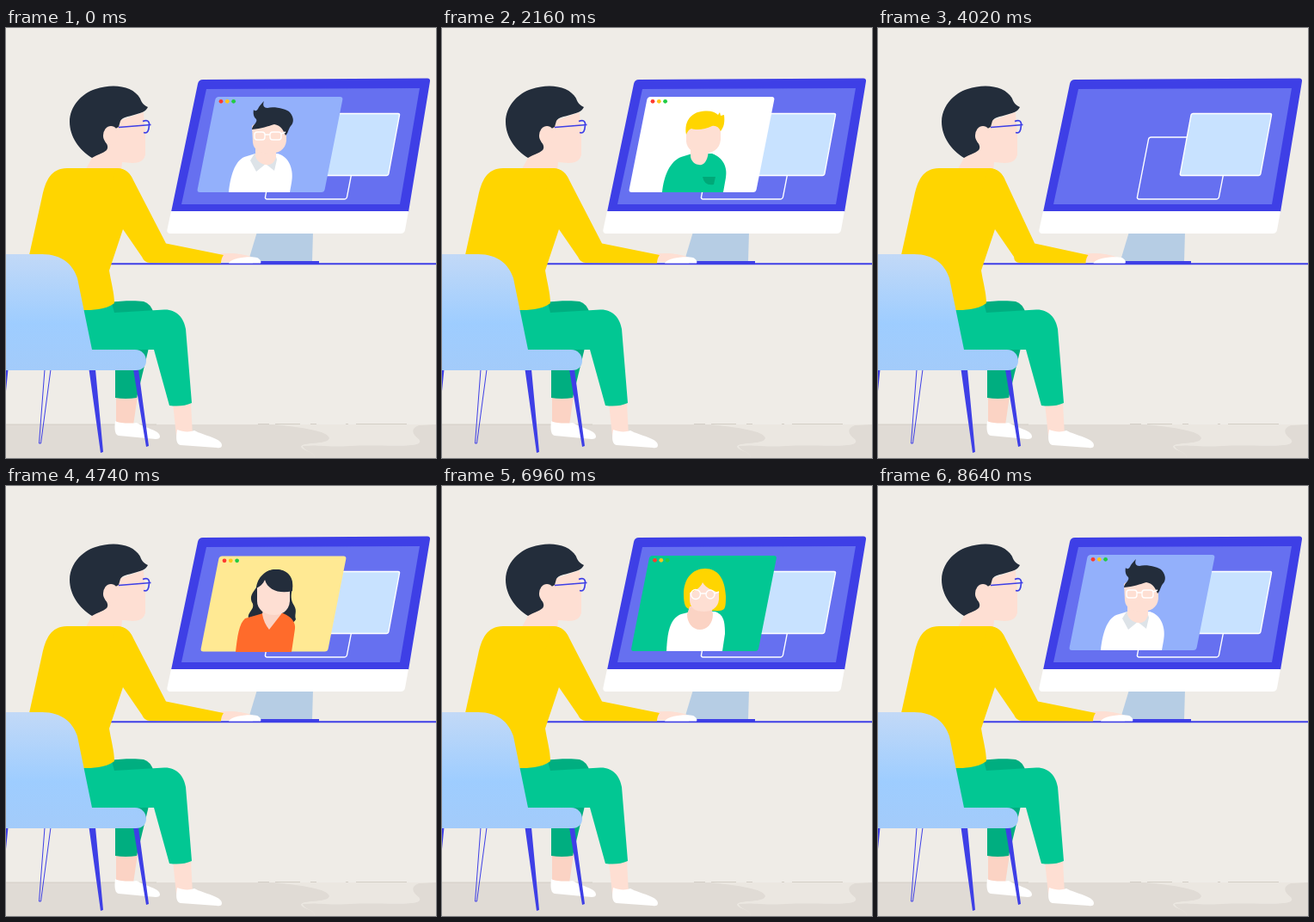
An HTML page for the animation above (9 s loop, 500x500 px).

```html
<!DOCTYPE html>
<html lang="en">
<head>
<meta charset="utf-8">
<title>Video call carousel</title>
<style>
  html, body { margin: 0; width: 100%; height: 100%; overflow: hidden; background: #efece7; }
  svg { display: block; width: 100vw; height: 100vh; }
  .skin { fill: #fedfd3; }
  .shade { fill: #fbd3c4; }
  .dark { fill: #232d3b; }
  .green { fill: #02c793; }
  .deep { fill: #00ae80; }
  .yellow { fill: #ffd500; }
  .blue { fill: #3e3fe6; }
  .white { fill: #fff; }
  .line { fill: none; stroke: #fff; stroke-width: 1.4; }
</style>
</head>
<body>
<svg viewBox="0 0 500 500">
  <defs>
    <linearGradient id="seat" x1="0" y1="0" x2="0" y2="1">
      <stop offset="0" stop-color="#c2d9f7"/>
      <stop offset=".6" stop-color="#9ecdff"/>
      <stop offset="1" stop-color="#a3cbfa"/>
    </linearGradient>
    <clipPath id="screen"><path d="M233 71 L481 70 L458 205 H204Z"/></clipPath>
  </defs>

  <!-- floor -->
  <path fill="#ebe7e1" d="M0 461 H500 V500 H0Z"/>
  <path fill="#e0dbd5" d="M0 461 H310 C345 464 375 469 376 477 C374 485 343 481 343 487 C347 493 359 492 359 500 H0Z"/>
  <path fill="#e0dbd5" d="M345 486 C365 484 375 488 400 486 C440 484 490 490 480 478 C472 472 470 465 481 462 L500 461 V500 H359 C359 492 347 493 345 486Z"/>
  <path stroke="#d3cec6" d="M0 461 H175 M293 460.5 H306 M313 460.5 H342 M354 460.5 H361 M395 460.5 H398 M407 460.5 H466"/>

  <!-- monitor -->
  <path fill="#b6cde4" d="M292 237 H357 L356 272 H283 V267Z"/>
  <path class="blue" d="M229 60 L490 58.5 Q493.5 58.5 493 62 L468 214 H192 L223 65 Q224 60 229 60Z"/>
  <path class="white" d="M192 213 H468 L464 235 Q463 239 459 239 H190 Q186.500 238 187.500 234Z"/>
  <path fill="#6670f0" d="M233 71 L481 70 L458 205 H204Z"/>
  <g clip-path="url(#screen)">
    <g transform="translate(301 199) skewX(-11)"><rect class="line" y="-72" width="95" height="72" rx="2.500"/></g>
    <g transform="translate(351 171.500) skewX(-10.500)"><rect class="line" style="fill:#c8e2ff" y="-72" width="93.500" height="72" rx="2"/></g>
    <g id="cards"></g>
  </g>

  <!-- desk -->
  <path class="blue" d="M121 273.200 H500 V275.200 H121Z M287 271 H364 V274 H287Z"/>

  <!-- legs and shoes -->
  <path class="shade" d="M128 428 H153 L148 462 H128Z"/>
  <path class="skin" d="M194 436 H215 L217 474 H198Z"/>
  <path class="white" d="M127 457 C133 460 146 460 152 459 C164 466 179 468 179 475 Q179 478 174 478 L131 474 Q125 473 127 457Z"/>
  <path class="white" d="M199 467 C206 470 214 470 219 468 C230 474 251 477 251 485 Q251 489 245 488 L203 485 Q196 484 199 467Z"/>
  <path class="deep" d="M127 372 H166 L152 430 Q139 432 127 430Z"/>
  <path class="deep" d="M120 319 C135 317 152 317 160 318 Q168 320 172 332 L120 336Z"/>
  <path class="green" d="M80 316 H122 L126 331 L184 327.500 C198 327 207 337 209 350 L216 436 Q205 441 190 439 L172 374 H80Z"/>

  <!-- viewer -->
  <path class="skin" d="M131 108 L160 98 C160 106 162 116 162 124 V147 C161 154 155 157 147 157 L135 156 L134 166 C120 170 103 168 93 164 L102 147Z"/>
  <path class="dark" d="M100 151 C85 142 74 126 74 109 C74 91 88 76 104 71 C124 64 148 67 156 82 C158 88 161 90 165 92 C162 98 156 99 149 101 C142 103 135 104 133 108 L131 115 L113 125 C114 133 121 136 117 142 C113 146 106 147 100 151Z"/>
  <ellipse class="skin" cx="122" cy="125" rx="9" ry="11"/>
  <path fill="none" stroke="#3e3fe6" stroke-width="1.700" d="M131 115.500 L168.500 112.500 M159 108.500 C164 106.500 167 108 166.500 113 C166 119 165 123 160 121.500"/>
  <path class="yellow" d="M42 196 C46 178 52 163 71 163 H128 C137 163 143 167 147 175 L150 210 L136 234 L120 282 C122 295 126 308 126 320 C115 328 100 328 90 328 L27 264Z"/>
  <g id="hand">
    <path class="skin" d="M245 263 C260 261 276 262 287 267 V272 H245Z"/>
    <path class="white" d="M259 273.500 C262 267 284 265 292 267 C296 269 297 272 296 273.500Z"/>
  </g>
  <path id="arm" class="yellow"/>

  <!-- chair -->
  <path class="blue" d="M96.500 397 H104 L113 493 L110 494Z M148 397 H154 L166 486 L163 487Z M0 397 H2.500 L0 422Z"/>
  <path fill="none" stroke="#3e3fe6" d="M45 397 L38.500 483 H40.500 L52 397"/>
  <path fill="url(#seat)" d="M0 263 H42 C65 263 78 275 83 291 L100 374 H150 C158 374 163 380 163 387 C163 393 159 398 151 398 H0Z"/>
</svg>

<script>
const LOOP = 9000;
const $ = id => document.getElementById(id);
const shape = (cls, d) => `<path class="${cls}" d="${d}"/>`;
const fill = (color, d) => `<path fill="${color}" d="${d}"/>`;

const people = {
  quiff:
    shape('white', 'M259 191 C261 172 266 155 277 150 L290 146 H316 C330 150 335 166 332 180 L330 191Z') +
    fill('#dde3e8', 'M289 146 L284 154 L291 167 L302 158 L312 166 L315 153 L313 146Z') +
    shape('skin', 'M290 138 H314 V150 C312 158 306 160 302 159 C296 158 291 154 290 149Z') +
    shape('skin', 'M286 114 C295 106 316 106 326 114 V131 C325 142 316 146 306 146 C295 146 288 142 287 133Z') +
    shape('dark', 'M286 118 C286 113 293 110 291 106 C288 104 287 99 288 95 C290 98 293 95 294 92 C296 89 298 87 300 85 C298 90 300 93 304 93 C312 91 326 94 330 98 C335 104 335 110 331 114 C328 118 328 123 325 125 C323 120 320 113 312 112 C305 114 297 117 286 118Z') +
    '<g class="line"><rect x="289" y="121" width="12" height="9" rx="3"/><rect x="307" y="121" width="13" height="9" rx="3"/><path d="M301 124 H307 M320 123 L325 121"/></g>',
  blond:
    shape('green', 'M256 191 C258 172 265 155 278 150 L291 146 H314 C328 151 332 163 330 174 L327 191Z') +
    shape('skin', 'M289 138 H311 L309 149 C307 157 303 160 299 159 C294 159 289 154 289 149Z') +
    shape('skin', 'M284 117 C294 108 314 108 324 115 V130 C323 141 314 146 304 146 C292 146 285 141 284 132Z') +
    shape('yellow', 'M284 124 C281 107 291 97 306 96.500 C313 96 318 98 321 101 L323 98 L324 102 L328 101 C329 109 328 115 324 120 C322 115 318 113 314 114 C306 118 296 119 290 117 C287 118 285 121 284 124Z') +
    fill('#00a878', 'M303 173 H318 L316 182 Q305 184 303 173Z'),
  waves:
    shape('dark', 'M298 106 C301 99 307 97 314 97 C328 97 335 107 333 119 C331 127 331 133 335 139 C339 146 335 149 337 155 C334 162 325 159 320 153 L298 148 C295 157 286 159 282 154 C280 147 289 144 287 137 C282 129 287 124 291 118Z') +
    fill('#ff6b2b', 'M267 193 C269 175 271 160 278 154 L299 148 H322 C333 152 337 160 336 166 L332 193Z') +
    shape('shade', 'M299 143 H321 L320 149 L306 167 C302 162 299 156 298 149Z') +
    shape('skin', 'M292 118 C297 103 323 105 330 118 V134 C329 146 320 150 312 150 C300 150 292 143 292 134Z') +
    shape('dark', 'M291 119 C292 106 302 97 314 97 C327 97 335 107 333 122 C319 126 304 121 301 109 C299 114 295 117 291 119Z'),
  bob:
    shape('yellow', 'M290 143 C283 144 281 137 281 126 C281 108 291 96 306 96 C321 96 329 108 330 128 C330 135 330 140 328 143 C325 146 319 145 314 145Z') +
    shape('white', 'M261 192 C262 170 265 154 278 149 L290 146 H317 C327 149 329 156 329 172 L326 192Z') +
    shape('shade', 'M288 140 H313 L315 149 C315 160 308 167 300 167 C291 167 285 159 285 149Z') +
    shape('skin', 'M288 116 C296 108 315 108 322 116 V132 C321 142 313 146 305 146 C294 146 288 142 288 132Z') +
    shape('yellow', 'M285 125 C285 106 296 100 306 100 C317 100 325 110 325 124 C316 123 307 119 303 112 C301 118 294 123 285 125Z') +
    '<g class="line"><circle cx="295" cy="126" r="5.500"/><circle cx="312" cy="126" r="5"/><path d="M300.500 125 H307 M317 125 L322 123"/></g>'
};

// start/end of arrival, start/end of departure, arrival easing power
const cards = [
  { who: 'quiff', color: '#93b0fb', x: 222, y: 191, time: [8220, 8640, 930, 1170], pow: 3 },
  { who: 'blond', color: '#ffffff', x: 217, y: 191, time: [1090, 1830, 3330, 3900], pow: 7 },
  { who: 'waves', color: '#ffe993', x: 226, y: 192.5, time: [4245, 4740, 6090, 6420], pow: 3 },
  { who: 'bob', color: '#02c793', x: 219.5, y: 192, time: [6360, 6960, 7950, 8280], pow: 3 }
];

const dots = ['#ff3b30', '#ffc61a', '#22cc44']
  .map((c, i) => `<circle cx="${28 + i * 7.3}" cy="-105.700" r="2.400" fill="${c}"/>`).join('');

for (const card of cards) {
  const g = document.createElementNS('http://www.w3.org/2000/svg', 'g');
  g.innerHTML = `<g transform="translate(${card.x} ${card.y})">
    <rect transform="skewX(-11.200)" y="-111" width="148" height="111" rx="3.500" fill="${card.color}"/>${dots}
    </g>${people[card.who]}`;
  $('cards').append(g);
  card.node = g;
}

// mouse hand: time, horizontal shift
const pulls = [
  [0, 0], [930, 0], [1080, -8.5], [1300, 0],
  [3330, 0], [3700, -8.5], [4150, -8.5], [4600, 0],
  [6090, 0], [6320, -8.5], [6800, 0],
  [7950, 0], [8180, -8.5], [8600, 0], [LOOP, 0]
];

const wrap = t => (t + LOOP) % LOOP;
const smooth = p => p * p * (3 - 2 * p);

function pull(t) {
  const i = pulls.findIndex(k => k[0] > t);
  const [t0, a] = pulls[i - 1], [t1, b] = pulls[i];
  return a + (b - a) * smooth((t - t0) / (t1 - t0));
}

function placeCard({ node, time: [in0, in1, out0, out1], pow }, t) {
  const age = wrap(t - in0), arrive = in1 - in0;
  const leave = wrap(out0 - in0), gone = wrap(out1 - in0);
  let dx = 0;
  if (age < arrive) dx = 260 * (1 - age / arrive) ** pow;
  else if (age > leave) dx = -195 * Math.min(1, (age - leave) / (gone - leave)) ** 2;
  node.setAttribute('visibility', age < gone ? 'visible' : 'hidden');
  node.setAttribute('transform', `translate(${dx.toFixed(2)} 0)`);
}

function draw(now) {
  const t = now % LOOP, h = pull(t);
  for (const card of cards) placeCard(card, t);
  $('hand').setAttribute('transform', `translate(${h} 0)`);
  $('arm').setAttribute('d', `M128 163 C137 163 143 167 147 175 L${186 + h * .45} 250.500
    L${253 + h} 264 Q${250 + h} 268 ${250 + h} 273.500 L${167 + h * .3} 273
    Q${161 + h * .3} 273 158 266 L136 234 L118 200Z`);
  requestAnimationFrame(draw);
}
draw(performance.now());
</script>
</body>
</html>
```
